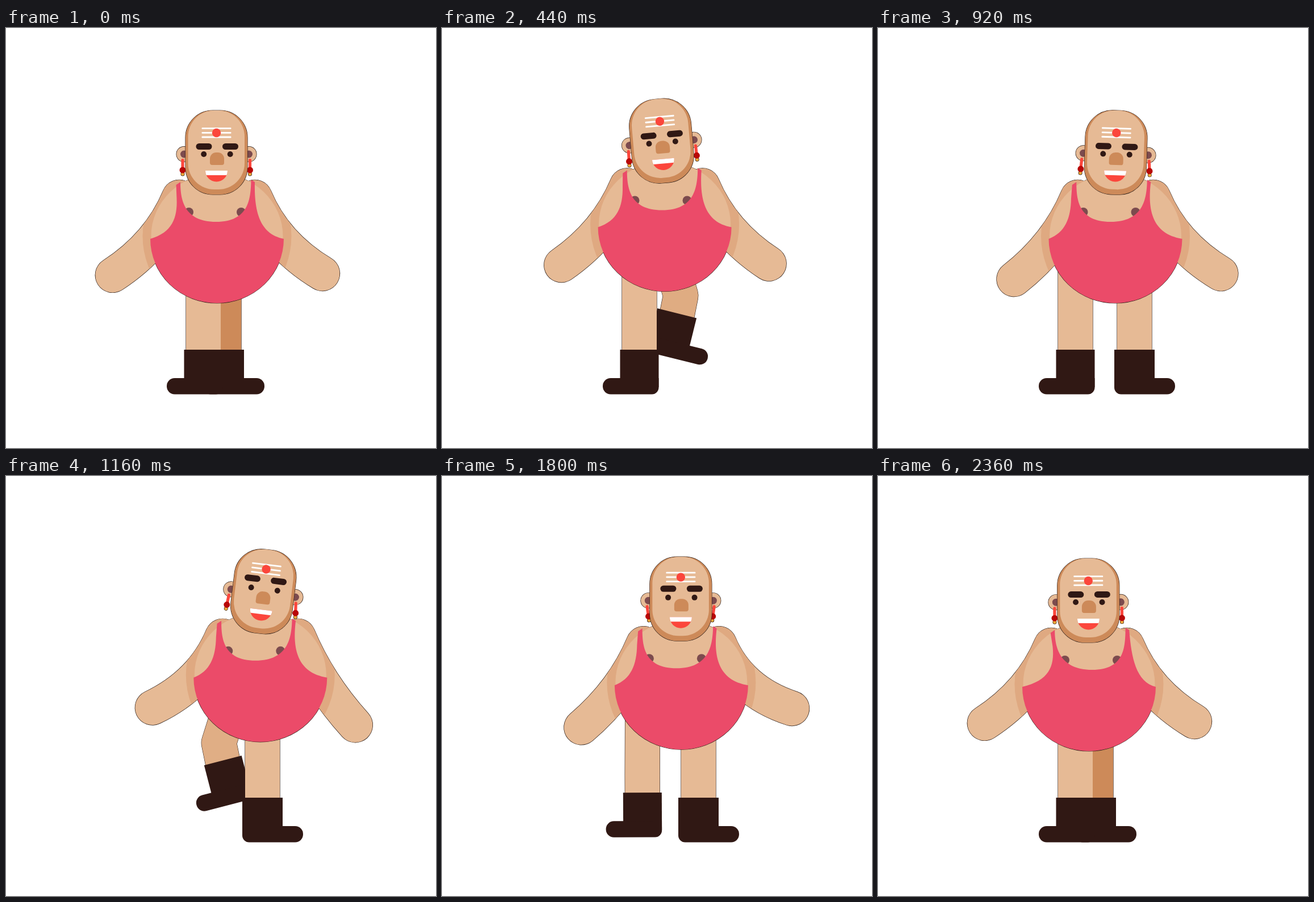
Recreate the animation shown at these times as an HTML page with a canvas. Size 757 px wide and 739 px high, loop 2.4 s.

```html
<!DOCTYPE html>
<html lang="en">
<head>
<meta charset="utf-8">
<title>Side-step dance</title>
<style>
html, body { margin: 0; height: 100%; overflow: hidden; background: #fff; }
canvas { display: block; }
</style>
</head>
<body>
<canvas id="stage" width="757" height="739"></canvas>
<script>
const c = document.getElementById('stage').getContext('2d');
const LOOP = 2400, RAD = Math.PI / 180, STRIDE = 68;
const SKIN = '#e6ba95', SHADE = '#cd8a59', SOFT = '#dfa981', PINK = '#eb4b69',
      DARK = '#301814', PLUM = '#7c4b4e', RED = '#fb463c', LINE = '#2b1c16';

// The dance is four hops; each carries the body sideways and swings one foot along
const steps = [
  { start: 270, span: 370, footSpan: 370, foot: 'right', sway: 46.5 },
  { start: 940, span: 350, footSpan: 440, foot: 'left', sway: 43 },
  { start: 1420, span: 460, footSpan: 460, foot: 'left', sway: -43 },
  { start: 2030, span: 330, footSpan: 330, foot: 'right', sway: -46.5 }
];

// Key poses in degrees: time, left arm, right arm, head, earrings
const poses = [
  [0, 33, 31, 0, 0],
  [240, 22.5, 48, -6.2, 0],
  [680, 51, 14, -3.5, 3],
  [1160, 25.5, 48, 7, 5],
  [1480, 33, 42, 3, 3],
  [1800, 40.5, 18, 0, -8],
  [2240, 33, 31, -1, 0]
];

const clamp = p => Math.min(1, Math.max(0, p));
const ease = p => p * p * (3 - 2 * p);
const arc = p => Math.sin(Math.PI * p) ** 3;
const bump = (t, center, reach) => ease(clamp(1 - Math.abs(t - center) / reach));

function poseAt(t) {
  const i = poses.findLastIndex(p => p[0] <= t);
  const a = poses[i], b = poses[i + 1] || [LOOP, ...poses[0].slice(1)];
  const u = ease((t - a[0]) / (b[0] - a[0]));
  return a.slice(1).map((v, j) => v + (b[j + 1] - v) * u);
}

function stanceAt(t) {
  const s = { x: 0, y: 0, chest: 0, left: { dx: 0, dy: 0 }, right: { dx: -STRIDE, dy: 0 } };
  for (const { start, span, footSpan, foot, sway } of steps) {
    const p = clamp((t - start) / span), q = clamp((t - start) / footSpan);
    s.x += sway * ease(p);
    s.y -= 21 * arc(p);
    s[foot].dx += Math.sign(sway) * STRIDE * ease(q);
    s[foot].dy -= 65.5 * arc(q);
    if (foot === 'right') s.chest += (sway > 0 ? -7 : 14) * ease(p);
  }
  return s;
}

function group(draw, x = 0, y = 0, angle = 0, sx = 1) {
  c.save();
  c.translate(x, y);
  c.scale(sx, 1);
  c.rotate(angle * RAD);
  draw();
  c.restore();
}
function fill(path, color) { c.fillStyle = color; c.fill(path); }
function stroke(path, color, width) { c.strokeStyle = color; c.lineWidth = width; c.stroke(path); }
function oval(x, y, rx, ry) {
  const p = new Path2D();
  p.ellipse(x, y, rx, ry, 0, 0, 7);
  return p;
}
function dot(x, y, r, color) { fill(oval(x, y, r, r), color); }
function box(x, y, w, h, r, color) {
  const p = new Path2D();
  p.roundRect(x, y, w, h, r);
  fill(p, color);
  return p;
}

function leg(base, side, half, toe, { dx, dy }, bodyY) {
  const bend = (dy / 65.5) ** 2, x = base + dx, y = 566 + dy;
  const depth = side * dx / STRIDE;
  const limb = new Path2D(`M${20 * bend} ${400 + bodyY - y}L${-7 * bend} -31L0 3`);
  const at = draw => group(draw, x, y, 0, side);
  return {
    depth,
    outline: () => at(() => stroke(limb, LINE, 62.2)),
    paint: () => at(() => {
      stroke(limb, SKIN, 61);
      c.globalAlpha = depth ** 2;
      stroke(limb, SHADE, 61);
      c.globalAlpha = 1;
      c.rotate(-14.5 * bend * RAD);
      box(-half, 0, 2 * half, 66, 0, DARK);
      box(-toe, 50, toe + half, 28.5, [14, 0, 12, 14], DARK);
    })
  };
}

function arm(angle) {
  const hx = 270 - 98 * Math.cos(angle * RAD), hy = 381.5 + 98 * Math.sin(angle * RAD);
  const limb = new Path2D(`M${hx} ${hy}Q270 381.5 305 298`);
  c.lineCap = 'round';
  stroke(limb, LINE, 62.4);
  stroke(limb, SKIN, 61);
  c.clip(oval(371.5, 366, 131, 139));
  stroke(limb, SOFT, 61);
}

function torso(n, leftArm, rightArm) {
  const body = new Path2D('M254 371A117.5 115 0 0 1 489 371A117.5 113 0 0 1 254 371Z');
  stroke(body, LINE, 1.2);
  group(() => arm(leftArm));
  group(() => arm(rightArm), 743, 0, 0, -1);
  fill(new Path2D('M255.5 366A116 110 0 0 1 487.5 366A116 116 0 0 1 255.5 366Z'), SKIN);
  dot(322 + n, 324, 8, PLUM);
  dot(414 + n, 324, 8, PLUM);
  const k = .6 * n, m = 1.3 * n;
  fill(new Path2D(`M254 371C${292 + m} 360 ${302 + m} 335 ${300.5 + n} 300L${299.5 + k} 276L${307 + k} 271
    C${307 + k} 300 ${312 + n} 341 ${370 + n} 341C${428 + n} 341 ${431 + k} 300 ${431.5 + k} 267
    L${438 + k} 271C${437 + m} 320 ${445 + m} 362 489 371A117.5 113 0 0 1 254 371Z`), PINK);
}

function ear(x, ringX, swing) {
  dot(x, 222, 14, LINE);
  dot(x, 222, 13.3, SKIN);
  dot(x, 222, 6.5, PLUM);
  group(() => {
    box(-2.6, -1, 5.2, 18, 2.5, RED);
    dot(0, 26, 3.5, LINE);
    dot(0, 26, 2.8, '#f3a93a');
    dot(0, 19, 5.5, '#b80808');
  }, ringX, 231, swing);
}

function head(swing, lift, open) {
  ear(313.5, 311, swing);
  ear(427.5, 429.5, -swing);
  stroke(box(316, 145, 109, 148, 48, SHADE), LINE, 1.2);
  box(316, 145, 109, 148, 48, SHADE);
  box(320.5, 145, 99.5, 139, 46, SKIN);

  for (let i = 0; i < 3; i++) box(344.5, 175.2 + 7.7 * i - 5 * lift, 52, 2.8, 1.2, '#fff');
  dot(370.5, 184.5 - 5 * lift, 7.7, RED);
  for (const x of [348.5, 395]) {
    box(x - 14, 203 - 10.5 * lift, 28, 11, 5.5, DARK);
    fill(oval(x - .3, 222 - 7.5 * lift, 5, 5 * open), DARK);
  }
  box(359, 219, 25, 22, [11, 11, 4, 4], SHADE);
  const mouth = new Path2D('M351 251H390A19.5 19.5 0 0 1 351 251Z');
  fill(mouth, RED);
  group(() => {
    c.clip(mouth);
    box(350, 250, 41, 9, 0, '#fff');
  });
}

function draw(t) {
  const [leftArm, rightArm, tilt, swing] = poseAt(t);
  const { x, y, chest, left, right } = stanceAt(t);
  const lift = bump(t, 1160, 170) + bump(t, 1740, 170);
  const open = 1 - bump(t, 1440, 80);
  c.fillStyle = '#fff';
  c.fillRect(0, 0, 757, 739);
  c.lineJoin = 'round';

  const legs = [
    leg(347.5, 1, 34, 64.5, left, y),
    leg(451.5, -1, 35.5, 71.5, right, y)
  ].sort((a, b) => b.depth - a.depth);
  legs.forEach(l => l.outline());
  legs.forEach(l => l.paint());

  group(() => {
    torso(chest, leftArm, rightArm);
    group(() => {
      c.translate(-370.5, -272);
      head(swing, lift, open);
    }, 370.5, 272, tilt);
  }, x, y);
}

function tick() {
  draw(performance.now() % LOOP);
  requestAnimationFrame(tick);
}
tick();
</script>
</body>
</html>
```
